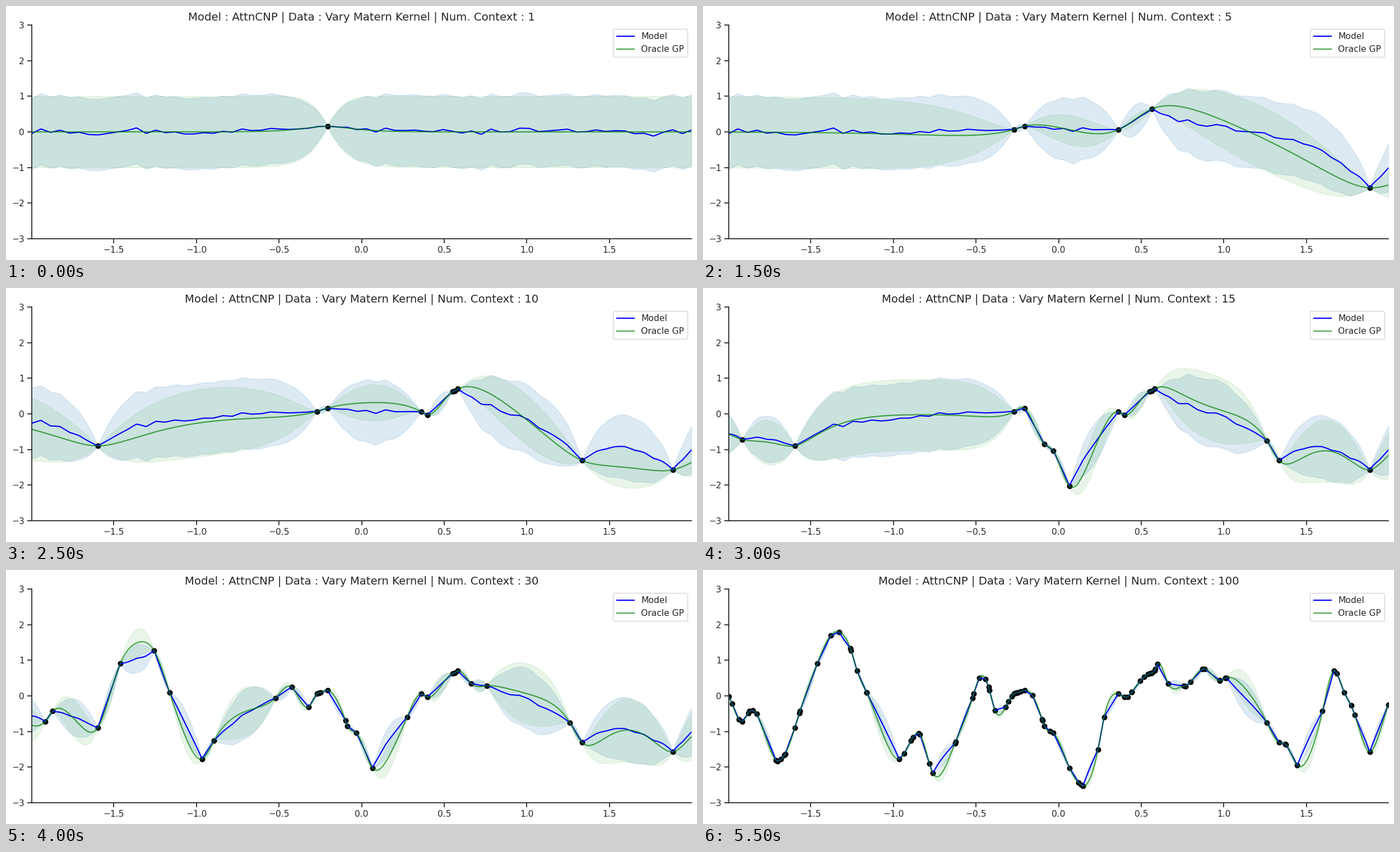
Write a matplotlib script that moves like this. It is 1233x454 px and loops after 6000 ms.

```python
import numpy as np
import matplotlib.pyplot as plt
from matplotlib.animation import FuncAnimation

W, H, DPI = 1233, 454, 128
PX = 72 / DPI                      # points per pixel
INK = "0.15"
COUNTS = [1, 2, 3, 5, 7, 10, 15, 20, 30, 50, 75, 100]
LENGTHS = [.177, .4, .5, .5, .5, .4, .21] + [.2] * 5   # oracle length scale per frame

# Observations in order of appearance; the remaining ones are sampled below.
KEY_POINTS = [
    (-.207, .16), (.362, .06), (-.269, .07), (.566, .645), (1.884, -1.57),
    (-1.598, -.9), (.398, -.03), (.55, .63), (.582, .705), (1.335, -1.31),
    (-1.916, -.72), (-.086, -.85), (-.033, -1.03), (.065, -2.02), (1.262, -.755),
    (-1.871, -.43), (-.25, .09), (.275, -.6), (.663, .35), (.76, .285),
    (-1.462, .905), (-1.256, 1.27), (-1.163, .1), (-.966, -1.77), (-.893, -1.25),
    (-.522, -.06), (-.424, .25), (-.32, -.31), (-.097, -.69), (-.26, .08),
    (-1.828, -.51), (-1.68, -1.78), (-1.661, -1.67), (-1.57, -.48), (-1.381, 1.69),
    (-1.22, .7), (-.762, -2.165), (-.158, .01), (.138, -2.5), (.239, -1.5),
    (.418, -.03), (.444, .11), (.77, .27), (.8, .4), (.976, .43),
    (1.376, -1.365), (1.73, .09), (1.772, -.27), (-.245, .1), (.56, .64),
    (1.997, -.25), (-1.996, -.01), (-.48, .51), (.598, .9), (1.667, .71),
    (1.445, -1.95), (-.84, -1.08), (-.627, -1.33), (-.386, -.41), (.147, -2.53),
    (.885, .76), (1.015, .51), (-1.703, -1.83), (1.598, -.43),
]


def exponential(r):
    return np.exp(-r)


def matern32(r):
    s = np.sqrt(3) * r
    return (1 + s) * np.exp(-s)


def regress(xs, cx, cy, kernel, length, noise=4e-4):
    """Gaussian process mean and standard deviation at xs."""
    def cov(a, b):
        return kernel(np.abs(a[:, None] - b) / length)
    cross = cov(xs, cx)
    weights = np.linalg.solve(cov(cx, cx) + noise * np.eye(len(cx)), cross.T).T
    var = 1 - np.sum(weights * cross, axis=1)
    return weights @ cy, np.sqrt(np.maximum(var, 0))


rng = np.random.default_rng(4)
key_x, key_y = np.array(KEY_POINTS).T
extra = COUNTS[-1] - len(key_x)
extra_x = np.clip(rng.choice(key_x, extra, replace=False) + rng.normal(0, .025, extra), -1.99, 1.99)
extra_y, _ = regress(extra_x, key_x, key_y, matern32, .2)
context_x = np.append(key_x, extra_x)
context_y = np.append(key_y, extra_y)

# Fixed ripple that roughens the model curve where it is uncertain.
ripple_x = np.linspace(-2, 2, 70)
ripple_y = rng.normal(0, .045, ripple_x.size)


def model(xs, cx, cy):
    """Short-range fit that falls back to zero between observations."""
    mean, _ = regress(xs, cx, cy, exponential, .28, 1e-4)
    _, std = regress(xs, cx, cy, matern32, .2)
    return mean + std * np.interp(xs, ripple_x, ripple_y), std


plt.rcParams["font.family"] = "DejaVu Sans"
fig = plt.figure(figsize=(W / DPI, H / DPI), dpi=DPI, facecolor="white")
left, right, top, bottom = 46.4, 1223.3, 34, 416
ax = fig.add_axes([left / W, 1 - bottom / H, (right - left) / W, (bottom - top) / H])
ax.set_xlim((left - 634.5) / 294.67, (right - 634.5) / 294.67)
ax.set_ylim(-3, 3)
ax.set_xticks(np.arange(-1.5, 1.6, .5))
ax.set_yticks(range(-3, 4))
ax.tick_params(length=8.45 * PX, width=1.76 * PX, pad=4.9 * PX, labelsize=15.5 * PX,
               color=INK, labelcolor=INK)
for side, spine in ax.spines.items():
    spine.set(visible=side in ("left", "bottom"), color=INK, linewidth=1.76 * PX)

blue_line, = ax.plot([], [], color="blue", lw=2.1 * PX, label="Model")
green_line, = ax.plot([], [], color="green", alpha=.7, lw=2.1 * PX, label="Oracle GP")
dots, = ax.plot([], [], "o", color="black", ms=10 * PX, mew=0, zorder=1.5)
legend = ax.legend(loc="upper right", fontsize=15.5 * PX, labelcolor=INK, borderaxespad=.47)
legend.get_frame().set_linewidth(1.41 * PX)
bands = []


def draw(i):
    cx, cy = context_x[:COUNTS[i]], context_y[:COUNTS[i]]
    xs = np.union1d(np.linspace(-2, 2, 601), cx)
    mean, std = model(xs, cx, cy)
    gp_mean, gp_std = regress(xs, cx, cy, matern32, LENGTHS[i])
    while bands:
        bands.pop().remove()
    for m, s, color, alpha in ((mean, std, "tab:blue", .15), (gp_mean, gp_std, "tab:green", .1)):
        bands.append(ax.fill_between(xs, m - s, m + s, color=color, alpha=alpha, lw=1.41 * PX))
    blue_line.set_data(xs, mean)
    green_line.set_data(xs, gp_mean)
    dots.set_data(cx, cy)
    ax.set_title(f"Model : AttnCNP | Data : Vary Matern Kernel | Num. Context : {COUNTS[i]}",
                 fontsize=19.7 * PX, color=INK, pad=8.5 * PX)
    return [blue_line, green_line, dots, *bands]


anim = FuncAnimation(fig, draw, frames=len(COUNTS), interval=500,
                     init_func=lambda: draw(0), repeat=True, repeat_delay=0)
plt.show()
```
